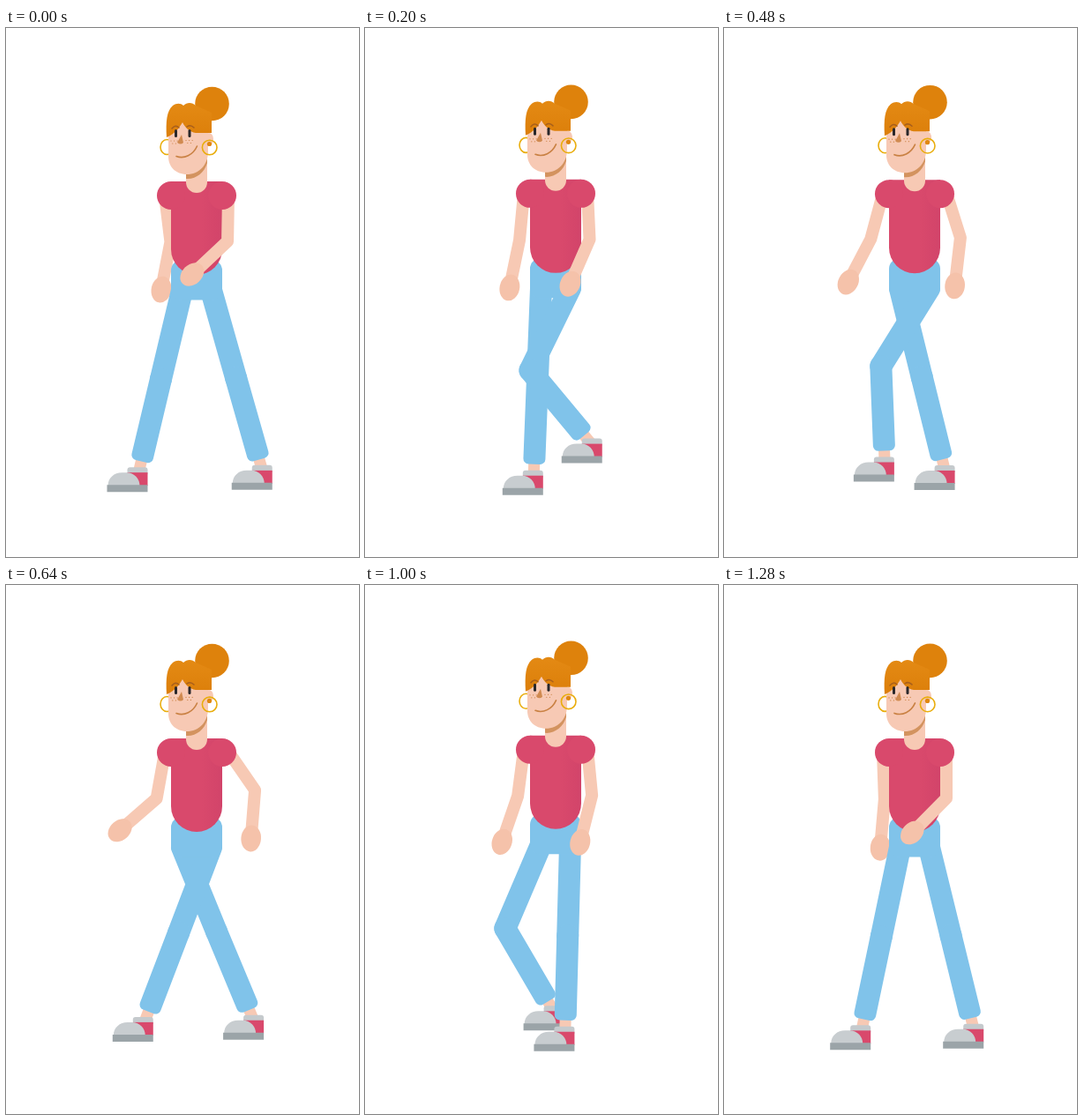
These frames come from a looping animation (400 by 600 pixels, 1320 ms). An HTML page with a canvas:

```html
<!DOCTYPE html>
<html lang="en">
<head>
<meta charset="utf-8">
<title>Walk cycle</title>
<style>
html, body { margin: 0; width: 100%; height: 100%; overflow: hidden; background: #fff; }
canvas { display: block; }
</style>
</head>
<body>
<canvas id="stage" width="400" height="600"></canvas>
<script>
const ctx = document.getElementById('stage').getContext('2d');
const LOOP = 1320, TAU = Math.PI * 2;

const SKIN = '#f7c9b4', HAND = '#f5c2aa', JEANS = '#80c3ea', SHIRT = '#d9496c';
const GOLD = '#e9ad0c', BROWN = '#c98143';

// Joint angles in degrees from straight down; positive swings to the right.
const TIMES = [0, 200, 340, 480, 640, 840, 1000, 1140, 1280];
const POSE = {
  farThigh:  [-13.4, -2.3, 5.5, 13.8, 22.2, -8.9, -23.1, -24, -11.8],
  farShin:   [-13.4, -2.3, 5.5, 13.8, 22.6, 39.5, 30.4, 4, -11.8],
  nearThigh: [15.8, -26, -33.5, -31.9, -20.9, -10.8, -1.6, 6.1, 13.7],
  nearShin:  [15.8, 39.8, 26, 2.4, -20.9, -10.8, -1.6, 6.1, 13.7],
  farUpper:  [7, -5.3, -11, -15, -10.2, -14.5, -7.5, -2.5, 2],
  farFore:   [-11, -11.7, -18, -27.5, -49, -24.8, -19, -11, -5],
  nearUpper: [-1, 2.7, 9, 17.4, 34.6, 14.3, 5.6, 1.5, 0],
  nearFore:  [-47, -23.7, -13, -6.6, -4.6, -5.5, -14, -28, -44.6]
};

// Periodic monotone cubic interpolation.
function sample(values, t) {
  const n = TIMES.length;
  const time = i => TIMES[(i + n) % n] + Math.floor(i / n) * LOOP;
  const value = i => values[(i + n) % n];
  const slope = i => (value(i + 1) - value(i)) / (time(i + 1) - time(i));
  const tangent = i => {
    const a = slope(i - 1), b = slope(i);
    return a * b > 0 ? 2 * a * b / (a + b) : 0;
  };
  let i = n - 1;
  while (TIMES[i] > t) i--;
  const h = time(i + 1) - time(i), u = (t - time(i)) / h, v = 1 - u;
  return v * v * (1 + 2 * u) * value(i) + u * u * (3 - 2 * u) * value(i + 1)
    + h * u * v * (v * tangent(i) - u * tangent(i + 1));
}

const polar = (p, deg, len) => {
  const a = deg * Math.PI / 180;
  return { x: p.x + Math.sin(a) * len, y: p.y + Math.cos(a) * len };
};

function fill(color, path) {
  ctx.fillStyle = color;
  ctx.fill(typeof path === 'string' ? new Path2D(path) : path);
}

function stroke(color, width, path) {
  ctx.strokeStyle = color;
  ctx.lineWidth = width;
  ctx.stroke(new Path2D(path));
}

function ellipse(color, x, y, rx, ry = rx, angle = 0) {
  const path = new Path2D();
  path.ellipse(x, y, rx, ry, angle, 0, TAU);
  fill(color, path);
}

function box(color, x, y, w, h, r = 0) {
  const path = new Path2D();
  path.roundRect(x, y, w, h, r);
  fill(color, path);
}

const limb = (color, width, ...points) =>
  stroke(color, width, 'M' + points.map(p => `${p.x} ${p.y}`).join('L'));

function shoe(x, y) {
  ctx.save();
  ctx.translate(x, y);
  box('#c5cacd', -23, -28, 23, 8, [3, 3, 0, 0]);
  box(SHIRT, -23, -22, 23, 15);
  fill('#c8cdd0', 'M-45-7C-45-16-38-22-29-22H-24C-15-22-9-15-9-7Z');
  box('#9ba4a8', -46, -8, 46, 8);
  ctx.restore();
}

function leg(hip, thigh, shin) {
  const knee = polar(hip, thigh, 103.5);
  const ankle = polar(knee, shin, 111);
  limb(SKIN, 13, polar(knee, shin, 85), ankle);
  shoe(ankle.x + 10.7, ankle.y + 20);
  limb(JEANS, 25, hip, knee);
  ctx.save();
  ctx.translate(knee.x, knee.y);
  ctx.rotate(-shin * Math.PI / 180);
  box(JEANS, -12.5, -12.5, 25, 108.5, [12.5, 12.5, 6, 6]);
  ctx.restore();
}

function arm(shoulder, upper, fore) {
  const elbow = polar(shoulder, upper, 53);
  const hand = polar(elbow, fore, 55);
  limb(SKIN, 14, shoulder, elbow, polar(elbow, fore, 47));
  ellipse(HAND, hand.x, hand.y, 11.3, 15, -fore * Math.PI / 180);
}

function torso() {
  const shade = ctx.createLinearGradient(187, 0, 245, 0);
  shade.addColorStop(0, SHIRT);
  shade.addColorStop(0.6, SHIRT);
  shade.addColorStop(1, '#d2446a');
  box(shade, 187, 174, 58, 106, [0, 0, 29, 29]);
}

function head() {
  // Neck and the shadow under the chin
  box(SKIN, 204, 145, 24, 42, [0, 0, 12, 12]);
  fill('#d3935f', 'M204 165C214 166 222 160 228 148V153C225 164 215 172 204 171Z');

  stroke(GOLD, 1.6, 'M190 135a7.5 8.5 0 1 1-15 0a7.5 8.5 0 1 1 15 0');
  ellipse(SKIN, 230, 126, 5, 7);
  fill(SKIN, 'M184 106H229V140C229 156 218 166 205 166C192 166 184 157 184 146Z');

  ellipse('#de820c', 233.5, 86, 19.3);
  const hair = ctx.createLinearGradient(0, 84, 0, 124);
  hair.addColorStop(0, '#e48a14');
  hair.addColorStop(1, '#dc7f0a');
  fill(hair, 'M182 124C181 106 182 94 189 88C193 85 198 85 201 88'
    + 'C205 84 211 84 215 88L233 96V119H215C208 118 203 113 200 107C196 114 191 120 182 124Z');

  // Face
  stroke('#a85f1c', 1.5, 'M188 114Q192 109 196 113M205 112Q209 109 213 113');
  box('#29272b', 191, 115, 3, 9, 1.5);
  box('#29272b', 206.5, 115, 3, 9, 1.5);
  fill('#d08a50', 'M199 121L201 130Q198 133 194 130Z');
  stroke(BROWN, 1.6, 'M193 145.5C202 149 212 144 216.5 134');
  for (let i = 0; i < 5; i++) {
    const dy = i % 2 * 3;
    ellipse(BROWN, 187 + i * 1.8, 128 + dy, 0.6);
    ellipse(BROWN, 204 + i * 1.8, 127.5 + dy, 0.6);
  }

  ellipse('#e0870f', 230.5, 131.5, 2.6);
  stroke(GOLD, 1.6, 'M239 135.5a8.3 8.3 0 1 1-16.6 0a8.3 8.3 0 1 1 16.6 0');
}

function draw() {
  const t = performance.now() % LOOP;
  const pose = {};
  for (const joint in POSE) pose[joint] = sample(POSE[joint], t);

  ctx.clearRect(0, 0, 400, 600);
  ctx.lineCap = ctx.lineJoin = 'round';
  ctx.save();
  ctx.translate(0, 1.6 * (Math.cos(t / LOOP * 2 * TAU) - 1));

  arm({ x: 180, y: 190 }, pose.farUpper, pose.farFore);
  leg({ x: 199.5, y: 297.5 }, pose.farThigh, pose.farShin);
  leg({ x: 232.5, y: 297.5 }, pose.nearThigh, pose.nearShin);
  box(JEANS, 187, 263, 58, 45.5, 12);
  torso();
  ellipse(SHIRT, 187, 190, 16);
  arm({ x: 252, y: 189 }, pose.nearUpper, pose.nearFore);
  ellipse(SHIRT, 245, 190, 16);
  head();

  ctx.restore();
  requestAnimationFrame(draw);
}
draw();
</script>
</body>
</html>
```
